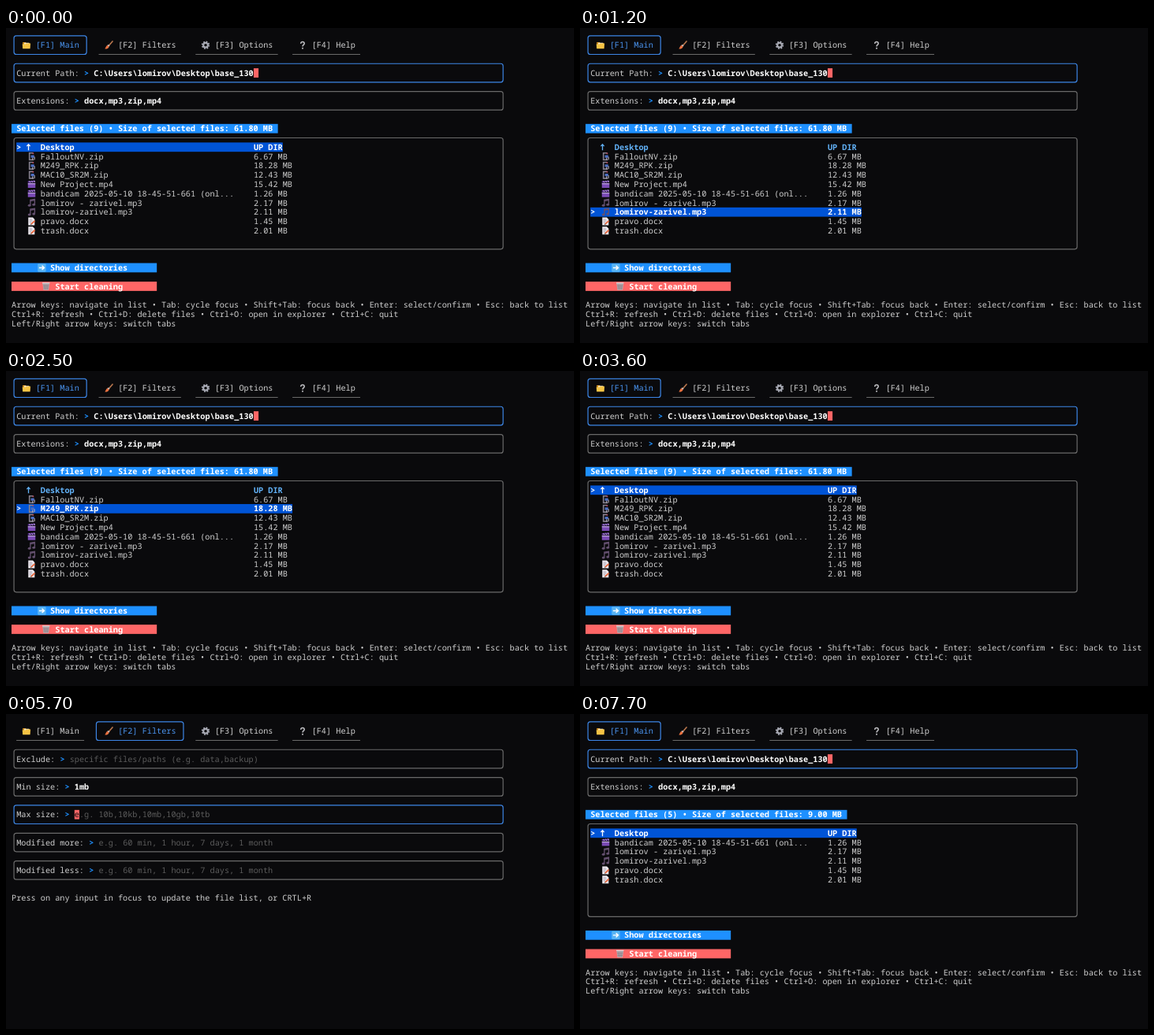
Write an HTML page that moves like this. It is 720 px wide and 400 px high and loops after 8000 ms.

```html
<!DOCTYPE html>
<html lang="en">
<head>
<meta charset="utf-8">
<title>File cleaner terminal</title>
<style>
  html, body { margin: 0; width: 100%; height: 100%; overflow: hidden; background: #0a0a0c; }
  svg { display: block; }
  #screen text {
    font: 500 10.232px "Noto Sans Mono", "DejaVu Sans Mono", monospace;
    white-space: pre;
    text-rendering: geometricPrecision;
    font-variant-ligatures: none;
  }
  #screen text.b { font-weight: 700; }
</style>
</head>
<body>
<svg width="720" height="400" viewBox="0 0 720 400">
  <defs>
    <symbol id="folder" viewBox="0 0 12 12">
      <path d="M1 2h4l1 1.3h4.5v7H1z" fill="#c98a1c"/>
      <path d="M3 3h6.5v3H3z" fill="#f4ead0"/>
      <path d="M.5 4.8h4.2l1-1h5.8l-.6 6.9H1.1z" fill="#f6c344"/>
    </symbol>
    <symbol id="brush" viewBox="0 0 12 12">
      <path d="M11 1L6.2 6.6" stroke="#b9774e" stroke-width="1.7" stroke-linecap="round"/>
      <path d="M7.3 6.9L5.4 5.2 4.2 6.3l1.9 1.9z" fill="#c9ccd2"/>
      <path d="M4.3 6.1l2 2C6 10.3 3.6 11.4.8 11 2.2 9.6 2 7 4.3 6.1z" fill="#e8703f"/>
    </symbol>
    <symbol id="gear" viewBox="0 0 12 12">
      <circle cx="6" cy="6" r="4.6" fill="none" stroke="#a9abb5" stroke-width="1.8" stroke-dasharray="1.9 1.713"/>
      <circle cx="6" cy="6" r="3" fill="none" stroke="#a9abb5" stroke-width="2.2"/>
    </symbol>
    <symbol id="help" viewBox="0 0 12 12">
      <path d="M3.8 4.1C3.7.8 8.7.8 8.5 4 8.4 5.8 6.2 5.8 6.2 7.8" fill="none" stroke="#b9b9bd" stroke-width="1.7"/>
      <circle cx="6.2" cy="10.2" r="1.1" fill="#b9b9bd"/>
    </symbol>
    <symbol id="zip" viewBox="0 0 12 12">
      <path d="M8 1.5H3v9h6" fill="none" stroke="#85808f" stroke-width="1.7"/>
      <path d="M5 4.4h4.4v3.4H5z" fill="#4d6fc4"/>
      <path d="M7.3 7.8v3M9.8 6.5v4" stroke="#b9b4c2" stroke-width="1.1"/>
      <circle cx="8" cy="2" r="1" fill="#b5485c"/>
    </symbol>
    <symbol id="clip" viewBox="0 0 12 12">
      <path d="M1 4.6h10v6.2H1z" fill="#7a4bb5"/>
      <path d="M1 1.7l9.6-.8.3 2.6L1 4.2z" fill="#5b3391"/>
      <path d="M3 1.6l1.2 2.2M6 1.4l1.2 2.2M9 1.1l1.2 2.2M1 5.4h10" stroke="#d9c9ee" stroke-width=".9"/>
    </symbol>
    <symbol id="note" viewBox="0 0 12 12">
      <path d="M4.3 9.3V2.2l5.8-1v7" fill="none" stroke="#64506f" stroke-width="1.4"/>
      <path d="M4.3 3.4l5.8-1" stroke="#64506f" stroke-width="1.6"/>
      <ellipse cx="3" cy="9.5" rx="2" ry="1.6" fill="#64506f"/>
      <ellipse cx="8.8" cy="8.5" rx="2" ry="1.6" fill="#64506f"/>
    </symbol>
    <symbol id="doc" viewBox="0 0 12 12">
      <path d="M1.5.8h6L10 3.3v8H1.5z" fill="#ece8ee"/>
      <path d="M3 3.5h3.5M3 5.5h4M3 7.5h2.4" stroke="#9b95a5" stroke-width=".8"/>
      <path d="M5.4 9.6l4.9-4.3" stroke="#e8663c" stroke-width="1.9"/>
      <path d="M4.3 10.6l.6-1.7 1.3 1.4z" fill="#5a3b30"/>
    </symbol>
    <symbol id="go" viewBox="0 0 12 12">
      <rect x=".5" y=".5" width="11" height="11" rx="1.5" fill="#58b4f5"/>
      <path d="M2.3 6h6.5M6.2 3.2L9.2 6 6.2 8.8" fill="none" stroke="#fff" stroke-width="1.5"/>
    </symbol>
    <symbol id="bin" viewBox="0 0 12 12">
      <path d="M1.3 1.7h9.4L9.5 11h-7z" fill="#b7a9ad"/>
      <path d="M3.4 3l.7 7.4M6 3v7.4M8.6 3l-.7 7.4M2.2 5.6h7.6M2.5 8.2h7" stroke="#877b82" stroke-width=".7"/>
      <path d="M1 1.7h10" stroke="#dcd3d6" stroke-width="1.2"/>
    </symbol>
  </defs>
  <g id="screen"></g>
</svg>
<script>
const CW = 6.139, RH = 11.78, LEFT = 7, TOP = 21.7, LOOP = 8000;
const C = {
  text: '#cfcfcf', white: '#ffffff', dim: '#5c5c5c', line: '#6a6a6a', focus: '#3d86e6',
  tab: '#4a94f0', blue: '#1e90ff', red: '#ff6666', pick: '#0054d6', dir: '#62b2f8', bg: '#0a0a0c'
};

// Terminal grid: column edges and row centres
const X = col => LEFT + col * CW;
const Y = row => TOP + row * RH;
const esc = s => s.replace(/&/g, '&amp;').replace(/</g, '&lt;').replace(/>/g, '&gt;');

const text = (col, row, s, fill = C.text, bold = false) =>
  `<text x="${X(col)}" y="${Y(row) + 3.6}" fill="${fill}"${bold ? ' class="b"' : ''}>${esc(s)}</text>`;
const bar = (col, row, cells, fill) =>
  `<rect x="${X(col)}" y="${Y(row) - RH / 2}" width="${cells * CW}" height="${RH}" fill="${fill}"/>`;
const box = (c1, r1, c2, r2, stroke) =>
  `<rect x="${X(c1 + .5)}" y="${Y(r1)}" width="${(c2 - c1) * CW}" height="${(r2 - r1) * RH}" rx="3" fill="none" stroke="${stroke}" stroke-width="1.2"/>`;
const icon = (id, col, row, dx = 1.4) =>
  `<use href="#${id}" x="${X(col) + dx}" y="${Y(row) - 5.7}" width="11.4" height="11.4"/>`;

const TABS = [
  ['folder', '[F1] Main', 1], ['brush', '[F2] Filters', 18],
  ['gear', '[F3] Options', 38], ['help', '[F4] Help', 58]
];

function tabs(active) {
  return TABS.map(([id, label, col], i) => {
    const on = i === active, end = col + label.length + 5;
    const frame = on
      ? box(col - 1, -1, end, 1, C.focus)
      : `<path d="M${X(col)} ${Y(1)}H${X(end)}" stroke="${C.line}" stroke-width="1.2"/>`;
    return frame + icon(id, col + 1, 0, .9) + text(col + 4, 0, label, on ? C.tab : C.text);
  }).join('');
}

function input(row, label, value, hint, focused) {
  const at = label.length + 4;
  let out = box(0, row - 1, 101, row + 1, focused ? C.focus : C.line)
    + text(1, row, label) + text(label.length + 2, row, '>', C.blue, true);
  out += value ? text(at, row, value, C.white, true) : text(at, row, hint, C.dim);
  if (focused) {
    const col = at + value.length;
    out += bar(col, row, 1, C.red);
    if (!value) out += text(col, row, hint[0], C.bg);
  }
  return out;
}

const FILES = [
  ['zip', 'FalloutNV.zip', 6.67], ['zip', 'M249_RPK.zip', 18.28], ['zip', 'MAC10_SR2M.zip', 12.43],
  ['clip', 'New Project.mp4', 15.42], ['clip', 'bandicam 2025-05-10 18-45-51-661 (onl...', 1.26],
  ['note', 'lomirov - zarivel.mp3', 2.17], ['note', 'lomirov-zarivel.mp3', 2.11],
  ['doc', 'pravo.docx', 1.45], ['doc', 'trash.docx', 2.01]
];
const HELP = [
  'Arrow keys: navigate in list • Tab: cycle focus • Shift+Tab: focus back • Enter: select/confirm • Esc: back to list',
  'Ctrl+R: refresh • Ctrl+D: delete files • Ctrl+O: open in explorer • Ctrl+C: quit',
  'Left/Right arrow keys: switch tabs'
];

function upArrow(row, fill) {
  const x = X(3) + 3.1, y = Y(row);
  return `<path d="M${x} ${y + 4}V${y - 3.4}M${x - 2.1} ${y - 1.2}L${x} ${y - 3.6}L${x + 2.1} ${y - 1.2}" fill="none" stroke="${fill}" stroke-width="1.3"/>`;
}

function fileRow(row, id, name, size, picked) {
  const fill = picked ? C.white : id ? C.text : C.dir;
  const bold = picked || !id;
  return (picked ? bar(1, row, 49 + size.length, C.pick) + text(1, row, '>', C.white, true) : '')
    + (id ? icon(id, 3, row) : upArrow(row, fill))
    + text(6, row, name, fill, bold) + text(50, row, size, fill, bold);
}

function mainView(pick, limit, total, bottom) {
  const files = FILES.filter(f => f[2] < limit);
  const title = ` Selected files (${files.length}) • Size of selected files: ${total} MB `;
  return tabs(0)
    + input(3, 'Current Path:', 'C:\\Users\\lomirov\\Desktop\\base_130', '', true)
    + input(6, 'Extensions:', 'docx,mp3,zip,mp4', '', false)
    + bar(0, 9, title.length, C.blue) + text(0, 9, title, C.white, true)
    + box(0, 10, 101, bottom, C.line)
    + fileRow(11, '', 'Desktop', 'UP DIR', pick === 0)
    + files.map(([id, name, mb], i) =>
        fileRow(12 + i, id, name, mb.toFixed(2) + ' MB', pick === i + 1)).join('')
    + bar(0, bottom + 2, 30, C.blue) + icon('go', 5, bottom + 2, 2)
    + text(8, bottom + 2, 'Show directories', C.white, true)
    + bar(0, bottom + 4, 30, C.red) + icon('bin', 6, bottom + 4, 1.2)
    + text(9, bottom + 4, 'Start cleaning', C.white, true)
    + HELP.map((s, i) => text(0, bottom + 6 + i, s)).join('');
}

function filterView(focus, max) {
  const when = 'e.g. 60 min, 1 hour, 7 days, 1 month';
  const fields = [
    ['Exclude:', '', 'specific files/paths (e.g. data,backup)'],
    ['Min size:', '1mb', ''],
    ['Max size:', max, 'e.g. 10b,10kb,10mb,10gb,10tb'],
    ['Modified more:', '', when],
    ['Modified less:', '', when]
  ];
  return tabs(1)
    + fields.map((f, i) => input(3 + 3 * i, ...f, i === focus)).join('')
    + text(0, 18, 'Press on any input in focus to update the file list, or CRTL+R');
}

const all = pick => mainView(pick, Infinity, '61.80', 22);
const small = () => mainView(0, 5, '9.00', 20);

// Start time, view, arguments
const STEPS = [
  [0, all, 0], [500, all, 1],
  [1000, all, 2], [1100, all, 4], [1200, all, 7], [1300, all, 9],
  [1800, all, 8],
  [2300, all, 7], [2400, all, 5], [2500, all, 2], [2600, all, 0],
  [3700, filterView, 0, ''], [4700, filterView, 1, ''], [5200, filterView, 2, ''],
  [5900, filterView, 2, '5'], [6000, filterView, 2, '5m'], [6100, filterView, 2, '5mb'],
  [7400, small]
];

const screen = document.getElementById('screen');
const start = performance.now();
let shown = null;

function draw() {
  const time = Math.max(0, performance.now() - start) % LOOP;
  const step = STEPS.filter(s => s[0] <= time).pop();
  if (step !== shown) {
    shown = step;
    const [, view, ...args] = step;
    screen.innerHTML = view(...args);
  }
  requestAnimationFrame(draw);
}
draw();
</script>
</body>
</html>
```
